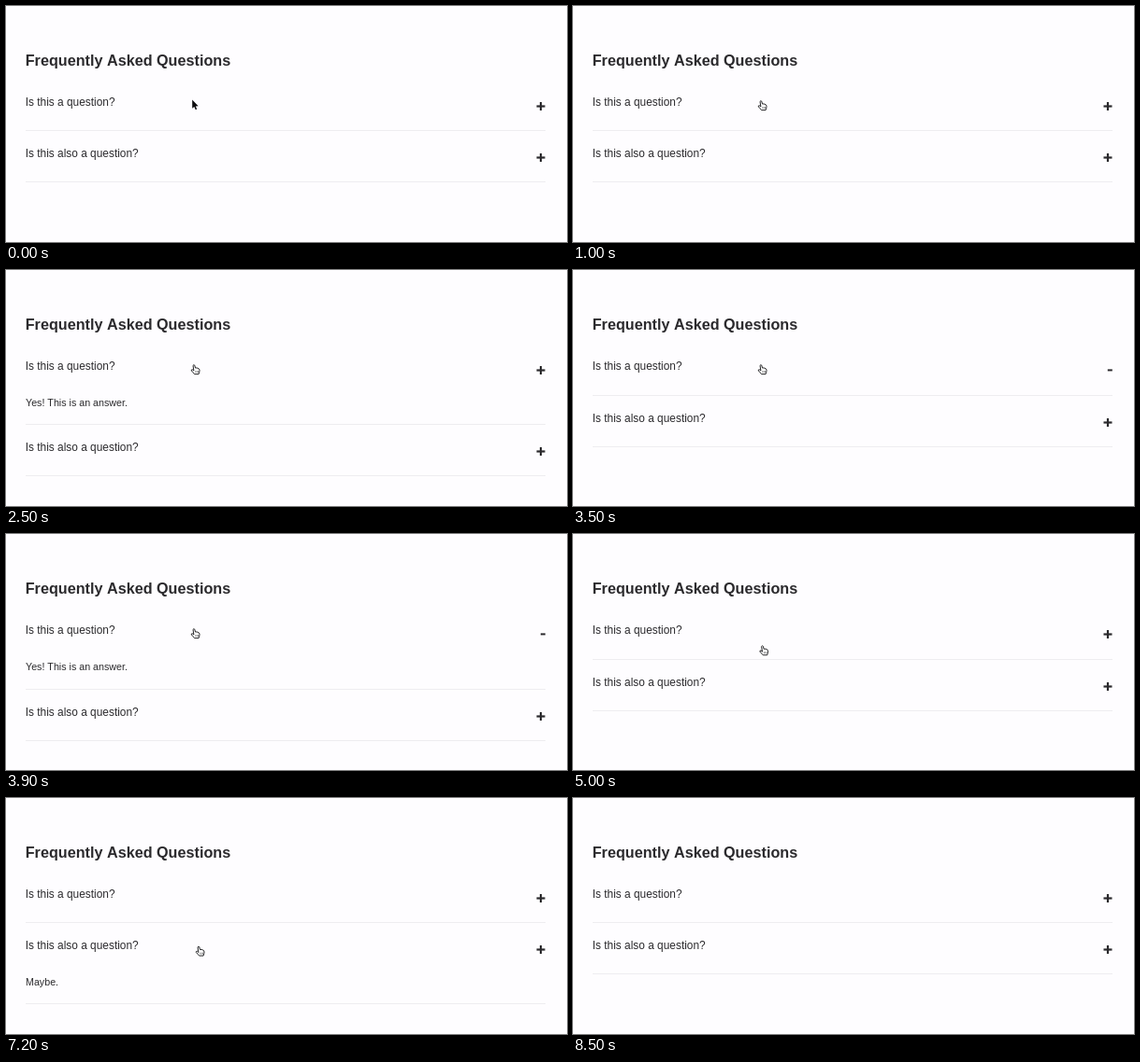
An HTML page with a canvas that plays this animation: 600x253 px, repeating every 8.9 s.

```html
<!DOCTYPE html>
<html lang="en">
<head>
<meta charset="utf-8">
<title>FAQ accordion</title>
<style>
  html, body { margin: 0; width: 100%; height: 100%; overflow: hidden; background: #fefdff; }
  canvas { display: block; width: 600px; height: 253px; }
</style>
</head>
<body>
<canvas id="stage"></canvas>
<script>
const W = 600, H = 253, LOOP = 8900, STEP = 100;
const LEFT = 21, RIGHT = 577, ROW = 55;
const ANSWER_HEIGHT = 33, SLIDE = 320, LEAD = 8;
const FONT = '"Liberation Sans", Arial, Helvetica, sans-serif';
const INK = '#2b2a2d';

const items = [
  { question: 'Is this a question?', answer: 'Yes! This is an answer.', open: [[1400, 2500], [3500, 4700]] },
  { question: 'Is this also a question?', answer: 'Maybe.', open: [[5800, 7200]] }
];

const canvas = document.getElementById('stage');
const ctx = canvas.getContext('2d');
const ratio = window.devicePixelRatio || 1;
canvas.width = W * ratio;
canvas.height = H * ratio;

const clamp = v => Math.min(1, Math.max(0, v));
const mix = (a, b, p) => a + (b - a) * p;
const smooth = p => p * p * (3 - 2 * p);

function text(str, x, y, size, weight = 'normal') {
  ctx.font = `${weight} ${size}px ${FONT}`;
  ctx.fillStyle = INK;
  ctx.fillText(str, x, y);
}

// Height of the visible part of an answer
function slide(item, t) {
  const progress = from => t < from ? 0 : clamp((t - from + LEAD) / SLIDE);
  return ANSWER_HEIGHT * item.open.reduce((sum, [a, b]) => sum + progress(a) - progress(b), 0);
}

function drawIcon(y, open) {
  ctx.fillStyle = INK;
  if (open) {
    ctx.fillRect(571.8, y - 1.1, 5, 2);
  } else {
    ctx.fillRect(567.5, y - 1.1, 9, 2.2);
    ctx.fillRect(570.9, y - 4.5, 2.2, 9);
  }
}

function drawItem(item, top, t) {
  const height = Math.round(slide(item, t));
  const line = top + ROW + height;
  const isOpen = item.open.some(([a, b]) => t >= a && t < b);

  text(item.question, LEFT - 0.3, top + 29, 11.9);
  drawIcon(top + 29.5, isOpen);

  if (height > 0) {
    ctx.save();
    ctx.beginPath();
    ctx.rect(0, top + ROW, W, height);
    ctx.clip();
    text(item.answer, LEFT, top + 68, 10.7);
    ctx.restore();
  }

  ctx.fillStyle = '#eeedf0';
  ctx.fillRect(LEFT, line, RIGHT - LEFT, 1);
  return line;
}

// Cursor moves: start, end, from, to, easing
const moves = [
  [100, 400, [197.5, 101], [211, 106], smooth],
  [700, 1000, [211, 106], [197.5, 101], smooth],
  [4700, 5500, [197.5, 101], [202.5, 158.5], smooth],
  [7900, 8400, [202.5, 158.5], [6, 82], p => p ** 1.5]
];

function cursorAt(t) {
  const [start, end, from, to, ease] = moves.filter(m => t >= m[0]).pop() || moves[0];
  const p = ease(clamp((t - start) / (end - start)));
  return [mix(from[0], to[0], p), mix(from[1], to[1], p)];
}

function drawArrow(x, y) {
  ctx.save();
  ctx.translate(x, y);
  ctx.beginPath();
  [[0, 0], [0, 9.2], [2.1, 7.3], [3.6, 10.6], [5, 10], [3.6, 6.8], [6.4, 6.6]]
    .forEach(([px, py]) => ctx.lineTo(px, py));
  ctx.closePath();
  ctx.lineJoin = 'round';
  ctx.lineWidth = 1;
  ctx.strokeStyle = '#fff';
  ctx.stroke();
  ctx.fillStyle = '#0c0c0e';
  ctx.fill();
  ctx.restore();
}

const hand = new Path2D(
  'M2.5 1.4 Q3.3 0 4.3 1.2 L5 4 Q7.2 3.5 9 5 Q9.9 6.4 9.3 8.2 L8.6 10.6 ' +
  'L4.1 10.6 Q2.6 8.8 .8 6.9 Q.6 5.4 2 5.8 L3.4 7 Z');
const knuckles = new Path2D('M5.3 7.2 V9 M6.7 7.2 V9 M8 7.2 V9');

function drawHand(x, y) {
  ctx.save();
  ctx.translate(x, y);
  ctx.fillStyle = '#fff';
  ctx.fill(hand);
  ctx.strokeStyle = '#1a1a1c';
  ctx.lineJoin = 'round';
  ctx.lineWidth = 0.95;
  ctx.stroke(hand);
  ctx.lineWidth = 0.5;
  ctx.stroke(knuckles);
  ctx.restore();
}

function drawCursor(t) {
  if (t >= 8500) return;
  if (t < 200) return drawArrow(199.2, 100.6);
  const [x, y] = cursorAt(t);
  if (x < LEFT || y < 90) drawArrow(x, y);
  else drawHand(x, y);
}

function draw(t) {
  ctx.setTransform(ratio, 0, 0, ratio, 0, 0);
  ctx.fillStyle = '#fefdff';
  ctx.fillRect(0, 0, W, H);
  text('Frequently Asked Questions', LEFT - 0.3, 64, 16.2, 'bold');
  items.reduce((top, item) => drawItem(item, top, t), 78);
  drawCursor(t);
}

const begin = performance.now();
function tick() {
  const t = (performance.now() - begin) % LOOP;
  draw(Math.floor(t / STEP) * STEP);
  requestAnimationFrame(tick);
}
tick();
</script>
</body>
</html>
```
